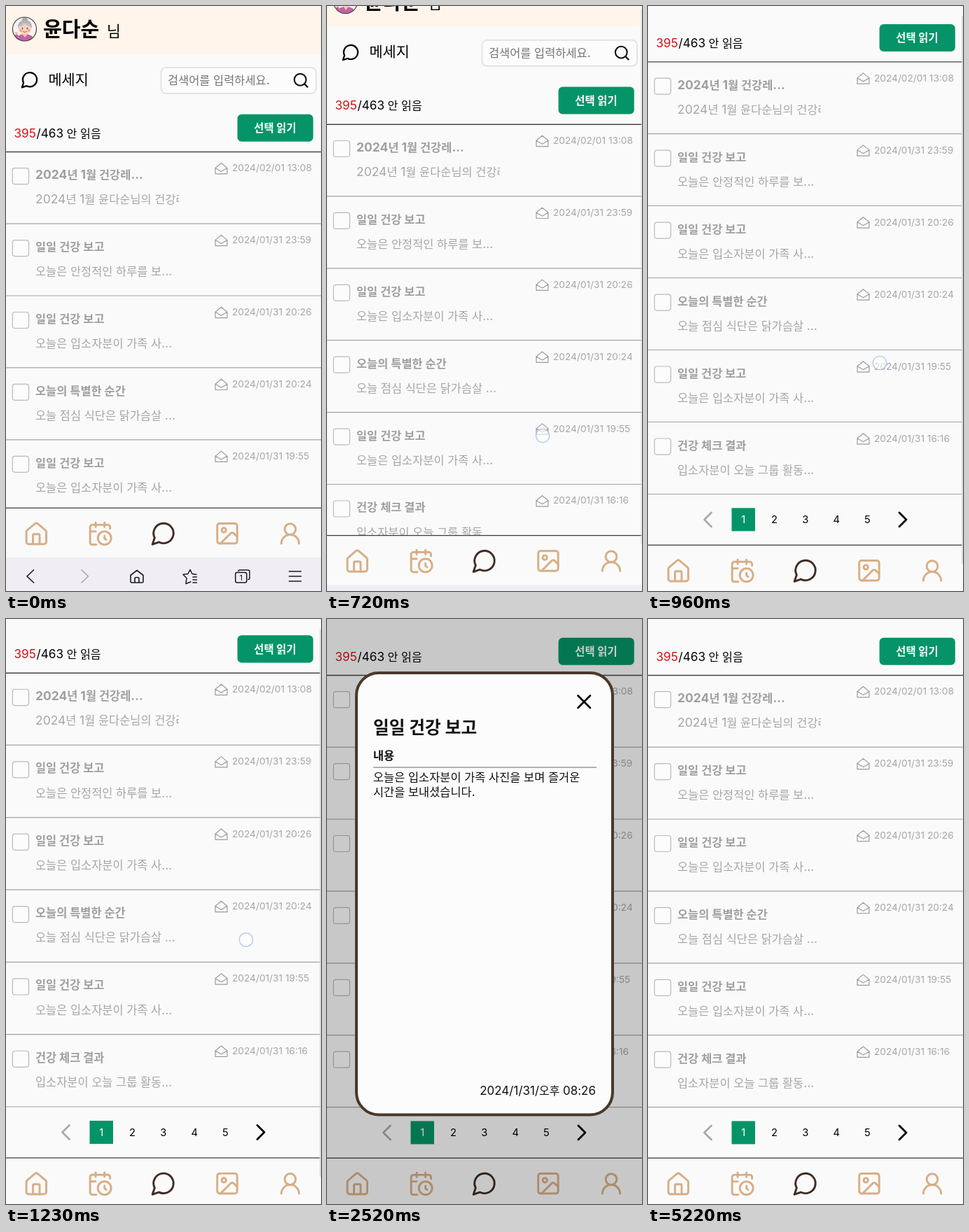
Animation, 450 px wide and 836 px high, one loop 6.03 s. Source, as an HTML page:

```html
<!DOCTYPE html>
<html lang="ko">
<head>
<meta charset="utf-8">
<title>메세지</title>
<style>
html, body { margin: 0; width: 100%; height: 100%; overflow: hidden; background: #fafafa; }
svg { display: block; width: 100vw; height: 100vh; font-family: Inter, 'Noto Sans CJK KR', 'Noto Sans CJK', sans-serif; }
</style>
</head>
<body>
<svg id="stage" viewBox="0 0 450 836" xmlns="http://www.w3.org/2000/svg"></svg>
<script>
const LOOP = 6030, STEP = 30, MAX_SCROLL = 128, BAR_TRAVEL = 53, ROW = 102.9;
const OPEN = 2520, CLOSE = 5130;
const BROWN = '#3f2d24', TAN = '#d8ae85', GREEN = '#059467', GRAY = '#a6a6a6';

// Hangul is set slightly smaller than the Latin digits beside it
function text(x, y, size, str, fill = '#000', attrs = '') {
  const runs = str.match(/[가-힣 ]+|[^가-힣 ]+/g).map(run =>
    `<tspan font-size="${/[가-힣]/.test(run) ? size * 0.94 : size}">${run}</tspan>`);
  return `<text x="${x}" y="${y}" font-size="${size}" fill="${fill}" ${attrs}>${runs.join('')}</text>`;
}
const BOLD = 'font-weight="700"';
const MIDDLE = 'text-anchor="middle"';

function rect(x, y, w, h, fill, attrs = '') {
  return `<rect x="${x}" y="${y}" width="${w}" height="${h}" fill="${fill}" ${attrs}/>`;
}
function line(d, color, width = 2) {
  return `<path d="${d}" fill="none" stroke="${color}" stroke-width="${width}" stroke-linecap="round" stroke-linejoin="round"/>`;
}
function rule(y, color, width) {
  return `<path d="M0 ${y}H450" stroke="${color}" stroke-width="${width}"/>`;
}
// 24-unit icon centred on cx, cy
function icon(cx, cy, color, body, scale = 1.58, width = 1.85) {
  return `<g transform="translate(${cx} ${cy}) scale(${scale}) translate(-12 -12)" fill="none" stroke="${color}"
    stroke-width="${width}" stroke-linecap="round" stroke-linejoin="round">${body}</g>`;
}

const ICONS = {
  chat: '<path d="M7.9 20A9 9 0 1 0 4 16.1L2 22Z"/>',
  home: '<path d="M3 10.5a2 2 0 0 1 .7-1.5l7-6a2 2 0 0 1 2.6 0l7 6a2 2 0 0 1 .7 1.5v9a2 2 0 0 1-2 2H5a2 2 0 0 1-2-2zM15 21.5v-8a1 1 0 0 0-1-1h-4a1 1 0 0 0-1 1v8"/>',
  calendar: '<path d="M21 7.5V6a2 2 0 0 0-2-2H5a2 2 0 0 0-2 2v14a2 2 0 0 0 2 2h3.5M16 2v4M8 2v4M3 10h5M17.5 17.5 16 16.3V14"/><circle cx="16" cy="16" r="6"/>',
  image: '<rect x="3" y="3" width="18" height="18" rx="2"/><circle cx="9" cy="9" r="2"/><path d="m21 15-3.1-3.1a2 2 0 0 0-2.8 0L6 21"/>',
  user: '<circle cx="12" cy="8" r="5"/><path d="M20 21a8 8 0 0 0-16 0"/>'
};

function avatar() {
  return `<clipPath id="face"><circle cx="26.5" cy="33" r="17"/></clipPath>
  <g clip-path="url(#face)">
    ${rect(9, 15, 36, 36, '#f7f3f3')}
    <circle cx="27" cy="20.5" r="4" fill="#a8a6aa"/>
    <ellipse cx="27" cy="28.5" rx="10" ry="8.5" fill="#b4b2b6"/>
    <path d="M14 52q0-12 13-12t14 12z" fill="#c063a4"/>
    <path d="M23 40h8l-4 5z" fill="#f3c3a5"/>
    <ellipse cx="27" cy="32.5" rx="9" ry="8.3" fill="#fad2b8"/>
    <path d="M18 30q2-6 9-6t9 6q-5-1-9-4-4 3-9 4z" fill="#c3c1c5"/>
    <circle cx="21.5" cy="35" r="2" fill="#f3a39d"/><circle cx="32.5" cy="35" r="2" fill="#f3a39d"/>
    <circle cx="23.5" cy="32" r="1" fill="#51403c"/><circle cx="30.5" cy="32" r="1" fill="#51403c"/>
    ${line('M24.5 36.5q2.5 2 5 0', '#b8554f', 1)}
    <path d="M13 37l3 0 2 8-4 2z" fill="#f3b99c"/>
    ${rect(12.5, 41, 5, 9, '#c063a4', 'rx="2"')}
  </g>
  <circle cx="26.5" cy="33" r="17" fill="none" stroke="#3c3434" stroke-width="1.1"/>`;
}

function header() {
  return rect(0, -10, 450, 78.5, '#fff5eb') + avatar()
    + text(53, 44, 31, '윤다순', '#000', BOLD)
    + text(144, 43.5, 23, '님')
    + icon(34, 105.2, '#000', ICONS.chat, 1.12, 2)
    + text(60.5, 112.7, 22.1, '메세지')
    + rect(221.5, 88, 221.5, 37, '#fcfcfc', 'rx="7" stroke="#e3e3e3" stroke-width="2"')
    + text(231, 112, 17.5, '검색어를 입력하세요.', '#757575')
    + '<circle cx="420.3" cy="105.3" r="8.4" fill="none" stroke="#111" stroke-width="2.1"/>'
    + line('M426.4 111.4L430.6 115.6', '#111', 2.2)
    + text(11.5, 187.5, 17.2, '395', '#d90f17')
    + text(43.5, 187.5, 17.2, '/463 안 읽음')
    + rect(330.6, 154.7, 108.2, 39.1, GREEN, 'rx="6"')
    + text(384.5, 180, 16.4, '선택 읽기', '#fff', BOLD + ' ' + MIDDLE);
}

const MESSAGES = [
  ['2024년 1월 건강레...', '2024년 1월 윤다순님의 건강레', '2024/02/01 13:08'],
  ['일일 건강 보고', '오늘은 안정적인 하루를 보...', '2024/01/31 23:59'],
  ['일일 건강 보고', '오늘은 입소자분이 가족 사...', '2024/01/31 20:26'],
  ['오늘의 특별한 순간', '오늘 점심 식단은 닭가슴살 ...', '2024/01/31 20:24'],
  ['일일 건강 보고', '오늘은 입소자분이 가족 사...', '2024/01/31 19:55'],
  ['건강 체크 결과', '입소자분이 오늘 그룹 활동...', '2024/01/31 16:16']
];

function row([title, body, date], i) {
  return `<g transform="translate(0 ${208 + i * ROW})">`
    + rect(9.3, 23.7, 23.2, 23, '#fcfcfc', 'rx="3.5" stroke="#b9b9b9" stroke-width="1.2"')
    + text(42, 39.2, 17.5, title, '#9f9f9f', BOLD)
    + `<g clip-path="url(#cell)">${text(42, 74.4, 17.5, body, GRAY)}</g>`
    + line('M299 23.5L307.5 16.5L316 23.5V31.8H299ZM299 23.5L307.5 28.5L316 23.5', '#9c9c9c', 1.2)
    + text(323, 28.2, 13.7, date, GRAY)
    + rule(ROW + 0.2, '#a3a3a3', 1.2) + '</g>';
}

function pager() {
  const pages = [1, 2, 3, 4, 5].map((n, i) =>
    text(136.3 + i * 44.3, 867.3, 14.8, String(n), i ? '#000' : '#fff', MIDDLE));
  return line('M90.5 852L80.5 862L90.5 872', '#aaa', 2.8)
    + rect(119.5, 845.5, 33.5, 33, GREEN) + pages.join('')
    + line('M359 852L369 862L359 872', '#000', 2.8);
}

function nav() {
  return rect(0, 717, 450, 130, '#fafafa') + rule(717.4, '#3c3c3c', 1.3)
    + icon(43.3, 754, TAN, ICONS.home)
    + icon(134.4, 754, TAN, ICONS.calendar)
    + icon(225, 753.6, BROWN, ICONS.chat)
    + icon(316, 753.8, TAN, ICONS.image)
    + icon(406, 754, TAN, ICONS.user);
}

function browserBar() {
  const ink = '#1b1b1f';
  return rect(0, 788, 450, 60, '#f0eef4')
    + line('M39.5 806L30 815L39.5 824', ink, 1.7)
    + line('M108 806L117.5 815L108 824', '#a9a8ae', 1.7)
    + line('M178 813.5L187 806.5L196 813.5V822.5Q196 824 194.5 824H179.5Q178 824 178 822.5ZM184 824V818Q184 816.5 187 816.5T190 818V824', ink, 1.6)
    + line('M264 823L257 825.5L258 817.5L253 812.5L260 811.5L263 805.5L266 811.5L272 812.5M267 816H272.5M267 820H272.5M267 824H272.5', ink, 1.5)
    + line('M332 807.5Q332 806 334 806H345.5Q348 806 348 808.5V817.5Q348 819.5 346 819.5', ink, 1.5)
    + rect(327.8, 809.5, 16, 14.5, 'none', `rx="2.5" stroke="${ink}" stroke-width="1.5"`)
    + text(335.8, 820.8, 11, '1', ink, MIDDLE)
    + line('M404.5 808H421.5M404.5 815H421.5M404.5 822H421.5', ink, 1.6);
}

function modal() {
  return rect(0, 0, 450, 836, '#000', 'opacity="0.2"')
    + rect(42, 77, 366, 631.5, '#fcfcfc', 'rx="32" stroke="#4a382b" stroke-width="4"')
    + line('M358.5 109.5L376 127M376 109.5L358.5 127', '#000', 2.6)
    + text(66, 163.5, 26.3, '일일 건강 보고', '#111', BOLD)
    + text(66, 201, 17.5, '내용', '#111', BOLD)
    + rect(66, 211.2, 319, 1.7, '#a3a3a3')
    + text(66, 232.2, 17.5, '오늘은 입소자분이 가족 사진을 보며 즐거운', '#111')
    + text(66, 253.2, 17.5, '시간을 보내셨습니다.', '#111')
    + text(384, 680, 17, '2024/1/31/오후 08:26', '#111', 'text-anchor="end"');
}

const stage = document.getElementById('stage');
stage.innerHTML = `
  <clipPath id="cell"><rect x="0" y="50" width="247" height="40"/></clipPath>
  ${rect(0, 0, 450, 836, '#fafafa')}
  <g id="view">
    <g id="page">${header()}${MESSAGES.map(row).join('')}${rule(208.5, '#444', 1.4)}${pager()}</g>
    <g id="dock">${nav()}${browserBar()}</g>
  </g>
  ${rect(448, 0, 2, 714, '#d9d9db', 'id="thumb"')}
  <g id="modal">${modal()}</g>
  <circle id="touch" r="9.7" fill="#fff" fill-opacity="0.6" stroke="#a9c6f2" stroke-width="1.3"/>`;

const [view, page, dock, thumb, popup, touch] =
  ['view', 'page', 'dock', 'thumb', 'modal', 'touch'].map(id => document.getElementById(id));

// Piecewise linear track: [time, value...]
function track(keys, t, k = 1) {
  if (t <= keys[0][0]) return keys[0][k];
  for (let i = 1; i < keys.length; i++) {
    const a = keys[i - 1], b = keys[i];
    if (t <= b[0]) return a[k] + (b[k] - a[k]) * (t - a[0]) / (b[0] - a[0]);
  }
  return keys[keys.length - 1][k];
}

const SCROLL = [[540, 0], [600, 3], [660, 16], [735, 45], [810, 78.3], [930, MAX_SCROLL]];
const STRETCH = [[930, 0], [1080, 0.0044], [1260, 0.0044], [1320, 0.002], [1410, 0]];
const FADE = [[510, 0], [660, 0.3], [810, 0.8], [2070, 0.8], [2340, 0]];
const TOUCHES = [
  [[510, 303, 663], [600, 303, 651], [660, 304, 635], [810, 314.5, 582.5], [960, 331, 510], [1080, 343, 460], [1260, 343, 458]],
  [[2070, 107, 335], [2190, 107, 335]],
  [[4950, 372.5, 110.5], [5070, 372.5, 110.5]]
];

function draw(time) {
  const t = Math.floor((time % LOOP) / STEP) * STEP;
  const scroll = track(SCROLL, t);
  const shift = Math.min(scroll, BAR_TRAVEL);
  const scale = 1 + track(STRETCH, t);

  page.setAttribute('transform', `translate(0 ${-scroll})`);
  dock.setAttribute('transform', `translate(0 ${shift})`);
  view.setAttribute('transform', `translate(0 ${836 * (1 - scale)}) scale(1 ${scale})`);

  thumb.setAttribute('y', scroll * 0.11);
  thumb.setAttribute('height', 714 + shift * 1.3);
  thumb.setAttribute('opacity', track(FADE, t));

  popup.setAttribute('display', t >= OPEN && t < CLOSE ? 'inline' : 'none');

  const press = TOUCHES.find(p => t >= p[0][0] && t <= p[p.length - 1][0]);
  touch.setAttribute('display', press ? 'inline' : 'none');
  if (press) {
    touch.setAttribute('cx', track(press, t, 1));
    touch.setAttribute('cy', track(press, t, 2));
  }
}

let start;
function tick(now) {
  if (start === undefined) start = now;
  draw(now - start);
  requestAnimationFrame(tick);
}
draw(0);
requestAnimationFrame(tick);
</script>
</body>
</html>
```
